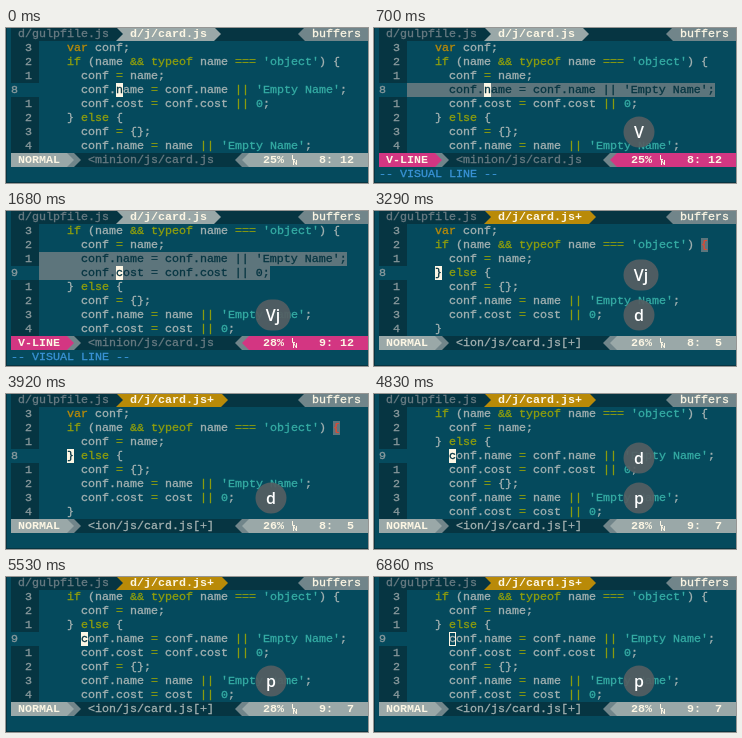
Write an HTML page with a canvas that moves like this. It is 362 by 155 pixels and loops after 6930 ms.

```html
<!DOCTYPE html>
<html lang="en">
<head>
<meta charset="utf-8">
<style>
html, body { margin: 0; width: 100%; height: 100%; overflow: hidden; background: #054a5d; }
canvas { display: block; }
</style>
</head>
<body>
<canvas id="stage" width="362" height="155"></canvas>
<script>
const ctx = document.getElementById('stage').getContext('2d');
const LOOP = 6930, CW = 7, CH = 14, LEFT = 5, TOP = -1, STATUS = 9;
const C = {
  bg: '#054a5d', dark: '#063542', text: '#a3b1b1', number: '#8a9a9d', dim: '#687b82',
  mid: '#71858a', light: '#9aa8a8', white: '#fcf6e4', green: '#8f9e0c', yellow: '#b98a08',
  cyan: '#35aca4', pink: '#d33682', blue: '#3a93d6', red: '#dc4a35', select: '#5d757c'
};

const head = ['    var conf;', "    if (name && typeof name === 'object') {", '      conf = name;'];
const moved = ["      conf.name = conf.name || 'Empty Name';", '      conf.cost = conf.cost || 0;'];
const tail = ['    } else {', '      conf = {};', "      conf.name = name || 'Empty Name';",
  '      conf.cost = cost || 0;', '    }'];
const before = [...head, ...moved, ...tail];
const deleted = [...head, ...tail];
const pasted = [...head, ...tail.slice(0, 1), ...moved, ...tail.slice(1)];

const scenes = [
  { at: 0, lines: before, top: 0, line: 8, col: 12, percent: 25 },
  { at: 700, lines: before, top: 0, line: 8, col: 12, percent: 25, selected: 1, keys: ['V'] },
  { at: 1680, lines: before, top: 1, line: 9, col: 12, percent: 28, selected: 2, keys: ['Vj'] },
  { at: 3290, lines: deleted, top: 0, line: 8, col: 5, percent: 26, changed: true,
    match: [2, 42], keys: ['d', 'Vj'], fade: 3780 },
  { at: 4830, lines: pasted, top: 1, line: 9, col: 7, percent: 28, changed: true,
    keys: ['p', 'd'], fade: 5390 }
];

const x = col => LEFT + col * CW;
const y = row => TOP + row * CH;

function fill(row, from, to, color) {
  ctx.fillStyle = color;
  ctx.fillRect(x(from), y(row), (to - from) * CW, CH);
}

// A hairline stroke gives the text its slightly heavy weight
function write(row, col, str, color, bold) {
  ctx.font = `${bold ? 'bold ' : ''}11.67px "Liberation Mono", monospace`;
  ctx.fillStyle = ctx.strokeStyle = color;
  ctx.lineWidth = .3;
  ctx.fillText(str, x(col), y(row) + 10);
  if (!bold) ctx.strokeText(str, x(col), y(row) + 10);
  ctx.lineWidth = 1;
}

// Powerline wedge; dir 1 points right, -1 points left
function wedge(row, col, color, back, dir = 1) {
  fill(row, col, col + 1, back);
  const base = x(dir > 0 ? col : col + 1);
  ctx.fillStyle = color;
  ctx.beginPath();
  ctx.moveTo(base, y(row));
  ctx.lineTo(base + dir * CW, y(row) + CH / 2);
  ctx.lineTo(base, y(row) + CH);
  ctx.fill();
}

function writeCode(row, str) {
  for (const m of str.matchAll(/'[^']*'|\w+|[=&|]+|[^\s\w'=&|]+/g)) {
    const token = m[0];
    const color = /^('|\d)/.test(token) ? C.cyan
      : token === 'var' ? C.yellow
      : /^(if|else|typeof|[=&|]+)$/.test(token) ? C.green : C.text;
    write(row, 4 + m.index, token, color);
  }
}

function drawTabs({ changed }) {
  const active = changed ? C.yellow : C.light;
  const end = changed ? 30 : 29;
  ctx.fillStyle = C.dark;
  ctx.fillRect(LEFT, 0, 357, 13);
  write(0, 1, 'd/gulpfile.js', C.dim);
  wedge(0, 15, C.dark, active);
  fill(0, 16, end, active);
  write(0, 17, 'd/j/card.js' + (changed ? '+' : ''), C.white, true);
  wedge(0, end, active, C.dark);
  wedge(0, 41, C.mid, C.dark, -1);
  fill(0, 42, 51, C.mid);
  write(0, 43, 'buffers', C.white);
}

function drawCode(s, hollow) {
  for (let i = 0; i < 8; i++) {
    const row = i + 1, str = s.lines[s.top + i];
    if (i === 3) {
      write(row, 0, String(s.line), C.number);
    } else {
      fill(row, 0, 4, C.dark);
      write(row, 2, String(Math.abs(i - 3)), C.number);
    }
    if (s.selected && i <= 3 && i > 3 - s.selected) {
      fill(row, 4, 4 + str.length, C.select);
      write(row, 4, str, C.dark);
    } else {
      writeCode(row, str);
    }
  }
  if (s.match) {
    const [row, col] = s.match;
    fill(row, col + 4, col + 5, C.select);
    write(row, col + 4, '{', C.red, true);
  }
  const col = s.col + 3;
  if (hollow) {
    ctx.strokeStyle = C.white;
    ctx.strokeRect(x(col) + .5, y(4) + .5, CW - 1, CH - 1);
  } else {
    fill(4, col, col + 1, C.white);
    write(4, col, s.lines[s.top + 3][s.col - 1], C.dark);
  }
}

function drawLineSymbol(col) {
  const px = x(col), py = y(STATUS);
  ctx.strokeStyle = C.white;
  ctx.beginPath();
  ctx.moveTo(px + 1.5, py + 2);
  ctx.lineTo(px + 1.5, py + 6.5);
  ctx.lineTo(px + 4, py + 6.5);
  ctx.moveTo(px + 2.5, py + 12);
  ctx.lineTo(px + 2.5, py + 7);
  ctx.lineTo(px + 5.5, py + 12);
  ctx.lineTo(px + 5.5, py + 7);
  ctx.stroke();
}

function drawStatus(s) {
  const main = s.selected ? C.pink : C.light;
  fill(STATUS, 0, 51, C.dark);
  fill(STATUS, 0, 8, main);
  write(STATUS, 1, s.selected ? 'V-LINE' : 'NORMAL', C.white, true);
  wedge(STATUS, 8, main, C.mid);
  wedge(STATUS, 9, C.mid, C.dark);
  write(STATUS, 11, s.changed ? '<ion/js/card.js[+]' : '<minion/js/card.js', s.changed ? C.text : C.dim);
  wedge(STATUS, 32, C.mid, C.dark, -1);
  wedge(STATUS, 33, main, C.mid, -1);
  fill(STATUS, 34, 51, main);
  write(STATUS, 36, s.percent + '%', C.white, true);
  drawLineSymbol(40);
  write(STATUS, 44, s.line + ':' + String(s.col).padStart(3), C.white, true);
  if (s.selected) write(STATUS + 1, 0, '-- VISUAL LINE --', C.blue);
}

function drawKey(label, cy, alpha) {
  const width = label.length > 1 ? 35 : 31;
  ctx.globalAlpha = alpha;
  ctx.fillStyle = 'rgba(84, 94, 98, .93)';
  ctx.beginPath();
  ctx.roundRect(249.5, cy - 15.5, width, 31, 15.5);
  ctx.fill();
  ctx.font = '600 16px "Open Sans", sans-serif';
  ctx.textAlign = 'center';
  ctx.fillStyle = '#fff';
  ctx.fillText(label, 249.5 + width / 2, cy + 6);
  ctx.textAlign = 'left';
  ctx.globalAlpha = 1;
}

function draw(t) {
  const s = scenes.findLast(scene => scene.at <= t);
  ctx.fillStyle = C.bg;
  ctx.fillRect(0, 0, 362, 155);
  ctx.fillStyle = C.dark;
  ctx.fillRect(0, 0, 1, 155);
  ctx.fillRect(0, 154, 362, 1);
  drawTabs(s);
  drawCode(s, t >= 6860);
  drawStatus(s);
  const [key, previous] = s.keys || [];
  if (key) drawKey(key, 104, 1);
  if (previous) {
    const steps = Math.floor((t - s.fade) / 70) + 1;
    const alpha = 1 - Math.min(3, Math.max(0, steps)) / 3;
    if (alpha > 0) drawKey(previous, 64, alpha);
  }
}

const start = performance.now();
function tick() {
  draw((performance.now() - start) % LOOP);
  requestAnimationFrame(tick);
}
tick();
</script>
</body>
</html>
```
